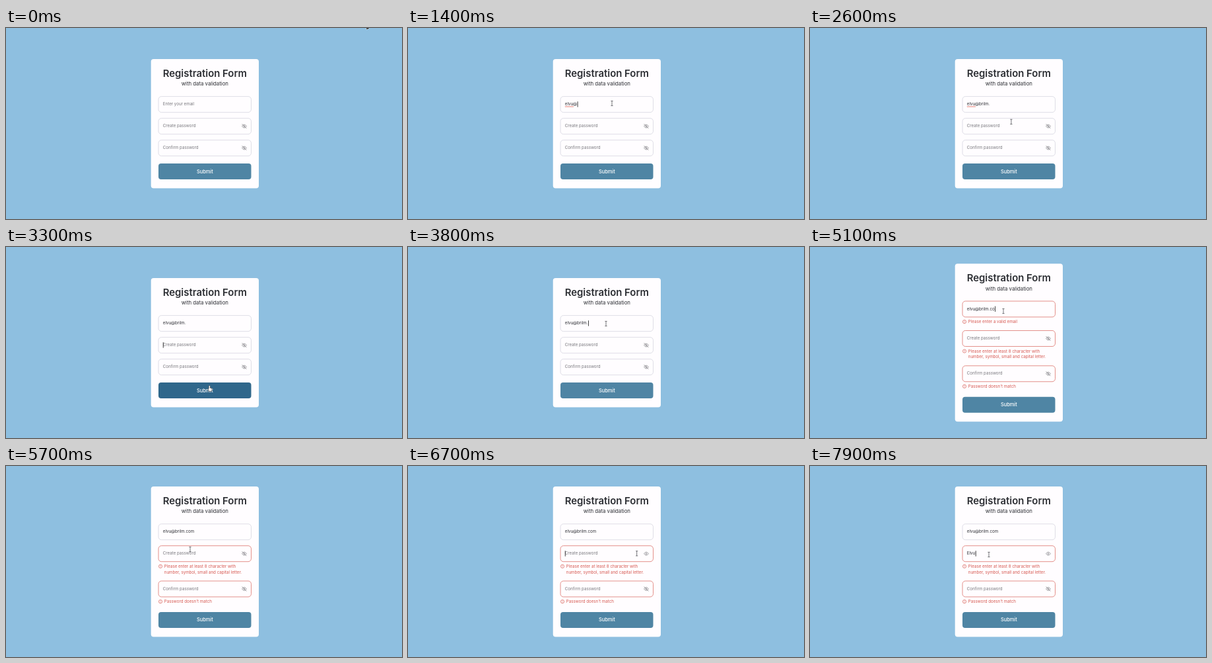
Write an HTML page with a canvas that moves like this. It is 600 px wide and 289 px high and loops after 8000 ms.

```html
<!DOCTYPE html>
<html lang="en">
<head>
<meta charset="utf-8">
<title>Registration Form</title>
<style>
  html, body { margin: 0; width: 100%; height: 100%; overflow: hidden; background: #8ebfe0; }
  canvas { display: block; width: 600px; height: 289px; }
</style>
</head>
<body>
<canvas id="stage"></canvas>
<script>
const LOOP = 8000, KEY_DELAY = 120, CLICK_DELAY = 100, BLINK = 500;
const FONT = 'Inter, "Open Sans", sans-serif';
const RED = '#d6574f', RED_BORDER = '#dc746c', INK = '#2c2e33', GREY = '#77777c', PAPER = '#fffdff';
const CENTER_X = 301.3, CENTER_Y = 144.75;
const LEFT = 231, WIDTH = 140.5, FIELD_H = 24, TEXT_X = 237.8, EYE_X = 361;
const EMAIL = 0, PASSWORD = 1, SUBMIT = 2;

const canvas = document.getElementById('stage');
const ctx = canvas.getContext('2d');
const scale = window.devicePixelRatio || 1;
canvas.width = 600 * scale;
canvas.height = 289 * scale;

// Places where the pointer rests; a click follows each arrival on a control.
const visits = [
  { arrive: 0, leave: 100, x: 548, y: -3 },
  { arrive: 500, leave: 2200, x: 309, y: 114, on: EMAIL },
  { arrive: 2750, leave: 2800, x: 304, y: 148, on: PASSWORD },
  { arrive: 3100, leave: 3350, x: 309, y: 214 },
  { arrive: 3700, leave: 4000, x: 300, y: 116, on: EMAIL },
  { arrive: 4300, leave: 4500, x: 308, y: 222, on: SUBMIT },
  { arrive: 4900, leave: 5350, x: 293, y: 97, on: EMAIL },
  { arrive: 5700, leave: 5900, x: 279, y: 126, on: PASSWORD },
  { arrive: 6300, leave: 6600, x: EYE_X, y: 132, on: PASSWORD },
  { arrive: 7000, leave: LOOP, x: 271, y: 134 }
];

// Bursts of typing at a steady pace
const emailBursts = [
  { at: 700, keys: 'elvu@' }, { at: 1500, keys: 'brilm.' },
  { at: 3900, keys: 'c' }, { at: 5050, keys: 'om' }
];
const passwordBursts = [{ at: 7150, keys: 'Elvu' }];

const between = (t, a, b) => t >= a && t < b;
const clamp = v => Math.max(0, Math.min(1, v));
const ease = v => v * v * (3 - 2 * v);
const inBox = (x, y, top, h) => between(x, LEFT, LEFT + WIDTH) && between(y, top, top + h);

function typed(bursts, t) {
  let text = '', lastKey = 0;
  for (const { at, keys } of bursts) {
    if (t < at) break;
    const count = Math.min(keys.length, 1 + Math.floor((t - at) / KEY_DELAY));
    text += keys.slice(0, count);
    lastKey = at + (count - 1) * KEY_DELAY;
  }
  return { text, lastKey };
}

function pointerAt(t) {
  const i = visits.findLastIndex(v => v.arrive <= t);
  const from = visits[i], to = visits[i + 1] || from;
  const k = ease(clamp((t - from.leave) / (to.arrive - from.leave)));
  return [from.x + (to.x - from.x) * k, from.y + (to.y - from.y) * k];
}

// Fades with the rest periods over the button
function hoverAt(t) {
  const levels = visits.filter(v => v.y > 200).map(v =>
    clamp((t - v.arrive + 150) / 200) * (v.on === SUBMIT && t >= v.leave ? 0 : clamp((v.leave + 280 - t) / 200)));
  return Math.max(...levels);
}

function text(str, x, y, size, color, weight = 400, align = 'left') {
  ctx.font = `${weight} ${size}px ${FONT}`;
  ctx.textAlign = align;
  ctx.fillStyle = color;
  ctx.fillText(str, x, y);
}

function outline(color, width) {
  ctx.strokeStyle = color;
  ctx.lineWidth = width;
  ctx.stroke();
}

function box(x, y, w, h, r, fill, border) {
  ctx.beginPath();
  ctx.roundRect(x, y, w, h, r);
  ctx.fillStyle = fill;
  ctx.fill();
  if (border) outline(border, 0.8);
}

function line(x1, y1, x2, y2) {
  ctx.moveTo(x1, y1);
  ctx.lineTo(x2, y2);
}

function eye(y, open) {
  const r = 3.4;
  ctx.beginPath();
  ctx.moveTo(EYE_X - r, y);
  ctx.quadraticCurveTo(EYE_X, y - 5, EYE_X + r, y);
  ctx.quadraticCurveTo(EYE_X, y + 5, EYE_X - r, y);
  ctx.moveTo(EYE_X + 0.9, y);
  ctx.arc(EYE_X, y, 0.9, 0, Math.PI * 2);
  if (!open) line(EYE_X - r, y - r, EYE_X + r, y + r);
  outline('#707075', 0.65);
}

function errorNote(lines, y) {
  ctx.beginPath();
  ctx.arc(234, y, 2.6, 0, Math.PI * 2);
  line(234, y - 1.4, 234, y + 0.3);
  line(234, y + 0.9, 234, y + 1.5);
  outline(RED, 0.65);
  lines.forEach((str, i) => text(str, 239.8, y + 2.2 + i * 8.6, 6.2, RED));
}

function spellingMark(y) {
  ctx.beginPath();
  for (let x = 0; x <= 13; x++) ctx.lineTo(TEXT_X + x, y + (x % 2 ? 0.4 : -0.4));
  outline('#e0503f', 0.8);
}

const cursors = {
  arrow(x, y) {
    ctx.beginPath();
    ctx.moveTo(x - 2, y - 1);
    ctx.lineTo(x - 2, y + 5.5);
    ctx.lineTo(x + 2.6, y + 3.7);
    ctx.closePath();
    ctx.fillStyle = '#222';
    ctx.fill();
    outline('#fff', 0.5);
  },
  beam(x, y) {
    ctx.beginPath();
    line(x - 1.6, y - 3.6, x + 1.6, y - 3.6);
    line(x, y - 3.6, x, y + 3.6);
    line(x - 1.6, y + 3.6, x + 1.6, y + 3.6);
    outline('#55555a', 0.8);
  },
  hand(x, y) {
    box(x - 1.5, y - 4.2, 1.7, 6, 0.8, '#fff', '#444');
    box(x - 2.4, y - 0.8, 5.4, 5.2, 1.8, '#fff', '#444');
    box(x - 1.3, y - 3.9, 1.3, 5, 0.6, '#fff');
  }
};

function draw(t) {
  const submitted = t >= 4500;
  const email = typed(emailBursts, t), password = typed(passwordBursts, t);
  const fields = [
    { hint: 'Enter your email', input: email,
      error: submitted && !email.text.endsWith('.com') && ['Please enter a valid email'] },
    { hint: 'Create password', input: password, eye: true, open: t >= 6400,
      error: submitted && ['Please enter at least 8 character with', 'number, symbol, small and capital letter.'] },
    { hint: 'Confirm password', input: { text: '' }, eye: true,
      error: submitted && ["Password doesn't match"] }
  ];
  const noteHeight = f => f.error ? 11.5 + (f.error.length - 1) * 8.8 : 0;
  const height = 195.5 + fields.reduce((sum, f) => sum + noteHeight(f), 0);
  const top = CENTER_Y - height / 2;
  const [px, py] = pointerAt(t);
  const click = visits.findLast(v => v.on !== undefined && v.arrive + CLICK_DELAY <= t);
  let cursor = 'arrow';

  ctx.setTransform(scale, 0, 0, scale, 0, 0);
  ctx.fillStyle = '#8ebfe0';
  ctx.fillRect(0, 0, 600, 289);
  box(219.7, top, 163.3, height, 4, PAPER);
  text('Registration Form', CENTER_X, top + 26.7, 14.9, INK, 600, 'center');
  text('with data validation', CENTER_X, top + 40.2, 7.8, INK, 400, 'center');

  let y = top + 56.6;
  fields.forEach((f, i) => {
    const value = f.input.text;
    box(LEFT, y, WIDTH, FIELD_H, 4.5, PAPER, f.error ? RED_BORDER : '#d6d6e0');
    text(value || f.hint, TEXT_X, y + 13.7, 6.2, value ? INK : GREY);
    if (f.eye) eye(y + 12, f.open);

    if (click && click.on === i) {
      if (i === EMAIL && value.includes('@') && !submitted && t < 2800) spellingMark(y + 15.4);
      const idle = t - Math.max(click.arrive + CLICK_DELAY, f.input.lastKey);
      if (idle % (2 * BLINK) < BLINK) {
        const caretX = TEXT_X + (value ? ctx.measureText(value).width + 0.6 : 0);
        ctx.fillStyle = '#111';
        ctx.fillRect(caretX, y + 7.6, 0.8, 8.4);
      }
    }
    if (inBox(px, py, y, FIELD_H)) cursor = f.eye && px > EYE_X - 5 ? 'hand' : 'beam';
    if (f.error) errorNote(f.error, y + FIELD_H + 7.1);
    y += 33 + noteHeight(f);
  });

  y += 2.4;
  const k = hoverAt(t);
  const mix = (a, b) => a + (b - a) * k;
  box(LEFT, y, WIDTH, FIELD_H, 4, `rgb(${mix(79, 47)}, ${mix(133, 103)}, ${mix(164, 139)})`);
  text('Submit', CENTER_X, y + 14.5, 7.4, '#fff', 500, 'center');
  if (inBox(px, py, y, FIELD_H)) cursor = 'hand';

  cursors[cursor](px, py);
}

const start = performance.now();
function frame() {
  draw((performance.now() - start) % LOOP);
  requestAnimationFrame(frame);
}
frame();
</script>
</body>
</html>
```
